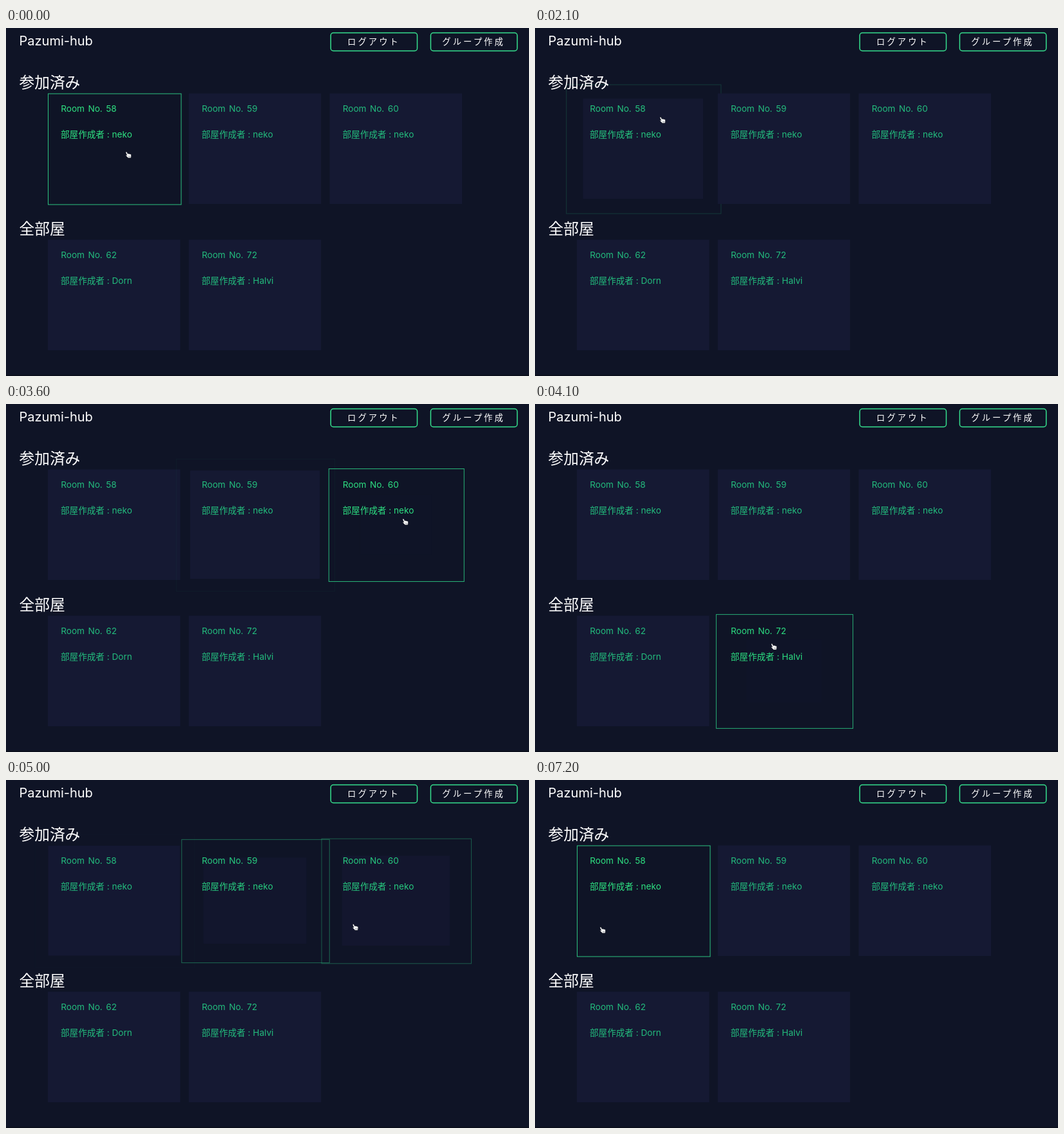
These frames come from a looping animation (812 by 540 pixels, 7.4 s). An HTML page:

```html
<!DOCTYPE html>
<html lang="ja">
<head>
<meta charset="utf-8">
<title>Rooms</title>
<style>
  html, body { margin: 0; width: 100%; height: 100%; overflow: hidden; background: #0f1426; }
  svg { display: block; width: 812px; height: 540px; }
  text { font-family: Inter, "Noto Sans CJK JP", "Noto Sans CJK", sans-serif; fill: #fff; white-space: pre; }
  .brand { font-size: 20px; }
  .head { font-size: 23.7px; }
  .btn rect { fill: none; stroke: #36e08e; stroke-width: 1.5; }
  .btn text { font-size: 13.3px; letter-spacing: 3.1px; }
  .card text { font-size: 13.6px; fill: inherit; }
  .card text:first-of-type { word-spacing: 1.7px; }
  .fill { fill: #151933; }
  .frame { fill: none; stroke: #2cc280; }
  .fill, .frame { transform-box: fill-box; transform-origin: center; }
  .hand { fill: #fff; stroke: #090c18; stroke-width: .8; stroke-linejoin: round; }
</style>
</head>
<body>
<svg viewBox="0 0 812 540">
  <rect width="812" height="540" fill="#0f1426"/>
  <rect y="538" width="812" height="2" fill="#0b0f1d"/>
  <g id="cards"></g>
  <text class="brand" x="20.5" y="27">Pazumi-hub</text>
  <g class="btn">
    <rect x="504.2" y="7.6" width="134.3" height="27.8" rx="4"/>
    <text x="530" y="26">ログアウト</text>
    <rect x="659.4" y="7.6" width="134.3" height="27.8" rx="4"/>
    <text x="677.3" y="26">グループ作成</text>
  </g>
  <text class="head" x="20.5" y="93">参加済み</text>
  <text class="head" x="20.5" y="320">全部屋</text>
  <g id="cursor">
    <g transform="scale(.87)">
      <path class="hand" d="M-4.6-5.2C-3.7-6.2-2.7-5.6-2.2-4.6L-1-2C0-2.8 1-2.4 1.3-1.8 2.2-2.4 3-2 3.2-1.4 4.4-1.8 5-.9 5.2 0 5.5 2 5.2 3.5 4.4 5.6H-.6C-1.8 3.8-3.4 2.6-4.6 1.2-4.9 0-3.6-.3-2.6.6L-4.7-3.8Z"/>
      <path d="M.4 1.4V4M2 1.4V4M3.5 1.4V4" stroke="#3a3f4c" stroke-width=".5"/>
    </g>
  </g>
</svg>
<script>
const LOOP = 7400, STEP = 100, FADE = 300, SCAN = 5;
const W = 205.5, H = 171.5;

const rooms = [
  { row: 0, col: 0, no: 58, owner: 'neko' },
  { row: 0, col: 1, no: 59, owner: 'neko' },
  { row: 0, col: 2, no: 60, owner: 'neko' },
  { row: 1, col: 0, no: 62, owner: 'Dorn' },
  { row: 1, col: 1, no: 72, owner: 'Halvi' }
];

// turning points of the pointer: time, x, y
const turns = [
  [100, 190, 197], [600, 210, 58], [2000, 210, 58], [2100, 198, 143],
  [2780, 271, 195], [2900, 349, 200], [3390, 494, 195], [3600, 620, 183],
  [4000, 440, 360], [4240, 274, 400], [4500, 150, 383], [4800, 290, 190],
  [4970, 570, 195], [5100, 450, 340], [5220, 275, 400], [5400, 115, 360],
  [5500, 97, 241], [6200, 105, 233]
];

const mix = (a, b, k) => a + (b - a) * k;

// cubic-bezier(.25, .1, .25, 1)
function ease(x) {
  if (x <= 0) return 0;
  if (x >= 1) return 1;
  const curve = (a, b, s) => 3 * a * s * (1 - s) ** 2 + 3 * b * s * s * (1 - s) + s ** 3;
  let lo = 0, hi = 1;
  for (let i = 0; i < 24; i++) {
    const mid = (lo + hi) / 2;
    if (curve(.25, .25, mid) < x) lo = mid; else hi = mid;
  }
  return curve(.1, 1, lo);
}

function pointer(t) {
  const i = turns.findIndex(p => p[0] > t);
  if (i === 0) return turns[0].slice(1);
  if (i < 0) return turns[turns.length - 1].slice(1);
  const [ta, xa, ya] = turns[i - 1], [tb, xb, yb] = turns[i];
  const k = (t - ta) / (tb - ta);
  return [mix(xa, xb, k), mix(ya, yb, k)];
}

const layer = document.getElementById('cards');
const cursor = document.getElementById('cursor');

function build(room) {
  const x = room.x = 65 + room.col * 218.75;
  const y = room.y = 101.5 + room.row * 227;
  layer.insertAdjacentHTML('beforeend', `
    <g class="card">
      <rect class="fill" x="${x}" y="${y}" width="${W}" height="${H}"/>
      <rect class="frame" x="${x + .5}" y="${y + .5}" width="${W + 1}" height="${H + .5}"/>
      <text x="${x + 20.2}" y="${y + 28.5}">Room No. ${room.no}</text>
      <text x="${x + 20}" y="${y + 68}">部屋作成者 : ${room.owner}</text>
    </g>`);
  room.card = layer.lastElementChild;
  [room.fill, room.frame] = room.card.children;
  room.events = crossings(room);
}

// moments when the pointer enters (goal 1) or leaves (goal 0) a room
function crossings({ x, y }) {
  const events = [];
  let last = 0;
  for (let t = 0; t < LOOP; t += SCAN) {
    const [px, py] = pointer(t);
    const goal = px > x && px < x + W && py > y && py < y + H ? 1 : 0;
    if (goal !== last) events.push({ at: t ? t : -FADE, goal });
    last = goal;
  }
  return events;
}

function hover(events, t) {
  const past = events.filter(e => e.at <= t);
  return past.reduce((value, { at, goal }, i) => {
    const end = i + 1 < past.length ? past[i + 1].at : t;
    return mix(value, goal, ease((end - at) / FADE));
  }, 0);
}

function draw(t) {
  for (const { card, fill, frame, events } of rooms) {
    const p = hover(events, t);
    fill.style.transform = `scale(${1 - p / 2})`;
    fill.style.opacity = 1 - p;
    frame.style.transform = `scale(${1.2 - p / 5})`;
    frame.style.opacity = p;
    card.style.fill = `rgb(${mix(35, 46, p)}, ${mix(188, 226, p)}, ${mix(125, 130, p)})`;
  }
  cursor.setAttribute('transform', `translate(${pointer(t)})`);
}

rooms.forEach(build);

const start = performance.now();
function tick() {
  const t = (performance.now() - start) % LOOP;
  draw(Math.floor(t / STEP) * STEP);
  requestAnimationFrame(tick);
}
tick();
</script>
</body>
</html>
```
